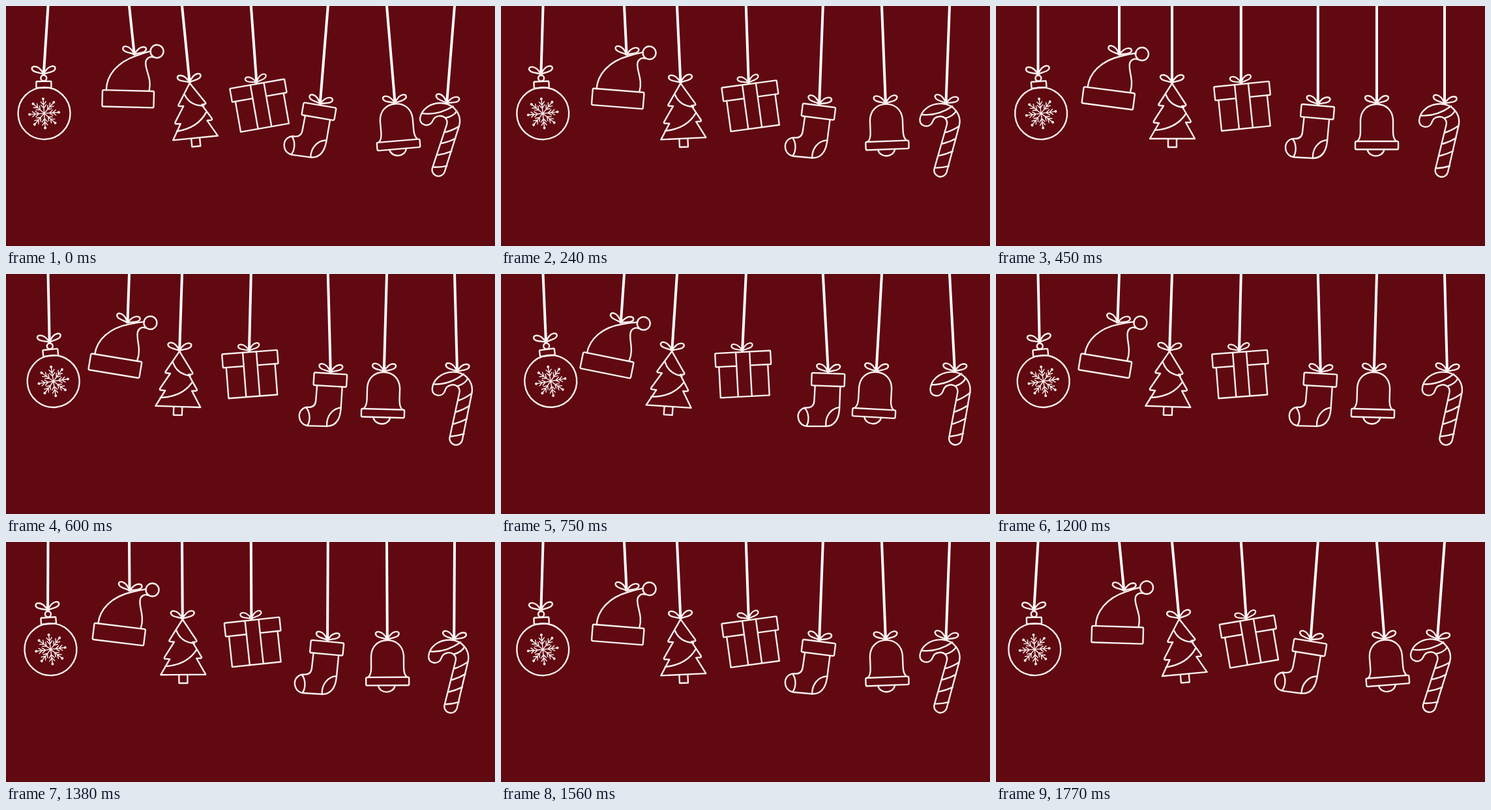
An HTML page for the animation above (1.8 s loop, 750 by 369 pixels).

```html
<!DOCTYPE html>
<html lang="en">
<head>
<meta charset="utf-8">
<title>Swinging ornaments</title>
<style>
  html, body { margin: 0; width: 100%; height: 100%; overflow: hidden; background: #600910; }
  svg { display: block; width: 750px; height: 369px; }
  g { fill: none; stroke: #f9f1f0; stroke-width: 2.4; stroke-linejoin: round; stroke-linecap: round; }
  .string { stroke: #fff; stroke-width: 4; stroke-linecap: butt; }
  .flake { stroke-width: 1.4; }
  .flake circle { fill: #f9f1f0; stroke: none; }
</style>
</head>
<body>
<svg id="stage" viewBox="0 0 750 369"></svg>
<script>
const PERIOD = 1800, STEP = 30;

const arm = '<path d="M0 0V-22M-4 -13L0 -8L4 -13M-4 -18L0 -13L4 -18"/><circle cy="-22.5" r="2"/>';
const flake = Array.from({ length: 8 }, (_, i) => `<g class="flake" transform="rotate(${i * 45 - 3.3})">${arm}</g>`).join('');

// x, y: where the string ends at rest; swing: largest angle; tilt: angle of the bow
const ornaments = [
  { x: 64.5, y: 106, swing: 3.68, tilt: -4.5, art: `
    <g transform="translate(64.5 106) rotate(-4.5)">
      <circle cy="5" r="4.5"/><rect x="-11.5" y="10" width="23" height="10" rx="1"/>
      <circle cy="59.3" r="40"/><g transform="translate(0 59.3)">${flake}</g>
    </g>` },
  { x: 189, y: 76, swing: -6, tilt: 8, art: `
    <circle cx="224" cy="73.8" r="10"/>
    <path d="M140.5 125C143 103 161 84 192 77Q204 74 214.5 72.5M206 132C212 115 203 100 205 89C206 83 212 80 217 82"/>
    <rect x="-39.5" y="-12.7" width="79" height="25.4" rx="2" transform="translate(172.3 141.8) rotate(7.4)"/>` },
  { x: 270, y: 119, swing: -5.65, tilt: 0, art: `
    <path d="M270 119L249.5 151Q249 153 251 153L257 153.5L242 177Q241 179.5 243.5 179.5L250 180L236 204H305L291 179L297 179Q299.5 178.5 298.5 176.5L285 154L290 153.5Q292 153 291 151Z"/>
    <path d="M260.5 136Q267 154 288 156M243 191Q276 189 291 166M264 204.5V217H277V204.5"/>` },
  { x: 375.8, y: 119, swing: -4.15, tilt: -7, size: .9, art: `
    <path transform="translate(377.5 130.5) rotate(-5.8)" d="M-10.5 10.5H-41.5Q-42.5 10.5 -42.5 9.5V-9.5Q-42.5 -10.5 -41.5 -10.5H41.5Q42.5 -10.5 42.5 -9.5V9.5Q42.5 10.5 41.5 10.5H10.5M-37.5 10.5V58H37.5V10.5M-10.5 -10.5V58M10.5 -10.5V58"/>` },
  { x: 493.8, y: 152, swing: 4.6, tilt: 5, art: `
    <rect x="-25.3" y="-9.7" width="50.6" height="19.4" rx="2" transform="translate(493 162.7) rotate(5)"/>
    <path d="M472.5 171L470 194Q469 204 459 204C450 203 444 210 444 217C444 226 450 232 458 232.5L486 234C498 234 506 226 508 208L511 175"/>
    <path d="M455 204.5C461 212 461 225 456 232M486 234C485 220 494 207 508 206"/>` },
  { x: 584, y: 151, swing: -4.83, tilt: 0, art: `
    <path d="M555 207Q559 203 559 193V175C560 160 570 151 584 151S608 160 609 175V193Q609 203 613 207M569.5 220.5C572 234 593 234 595.5 220.5"/>
    <rect x="551" y="208" width="66" height="12.5" rx="2"/>` },
  { x: 688, y: 151, swing: 4.57, tilt: 5, art: `
    <path d="M709.5 184L693 255.5A9.7 9.7 0 0 1 674 250.5L690.5 183C692.5 174 685 169 678 170.5C670 172 670 176 667.5 181C663 189 649 187 649 176C650 162 664 150 682 150.5C702 151 713 168 709.5 184Z"/>
    <path d="M652 168.5Q676 170 698 154M688 172.5Q700 169 704 161M689 194.5Q700 191 709.5 184M685 212Q696 209 705.5 203M680.5 230.5Q691 228 701 223M676 249.5Q686 249 696 246"/>` }
];

const loop = 'M0 0C-3 -6 -8 -11.5 -13 -12S-19.5 -8.5 -16 -5.5S-5 -2.5 0 0Z';
const stage = document.getElementById('stage');
stage.innerHTML = ornaments.map(({ x, y, tilt, size = 1, art }) => `<g>
  <path class="string" d="M${x} -10V${y}"/>
  <g transform="translate(${x} ${y - 1}) rotate(${tilt}) scale(${size})">
    <path d="${loop}"/><path d="${loop}" transform="scale(-1 1)"/>
  </g>${art}</g>`).join('');
const groups = [...stage.children];

const start = performance.now();
function draw(now) {
  const t = Math.floor(Math.max(0, now - start) % PERIOD / STEP) * STEP;
  const wave = Math.abs(4 * t / PERIOD - 2) - 1; // linear swing from 1 to -1 and back
  ornaments.forEach(({ x, swing }, i) => groups[i].setAttribute('transform', `rotate(${swing * wave} ${x} 0)`));
  requestAnimationFrame(draw);
}
draw(start);
</script>
</body>
</html>
```
